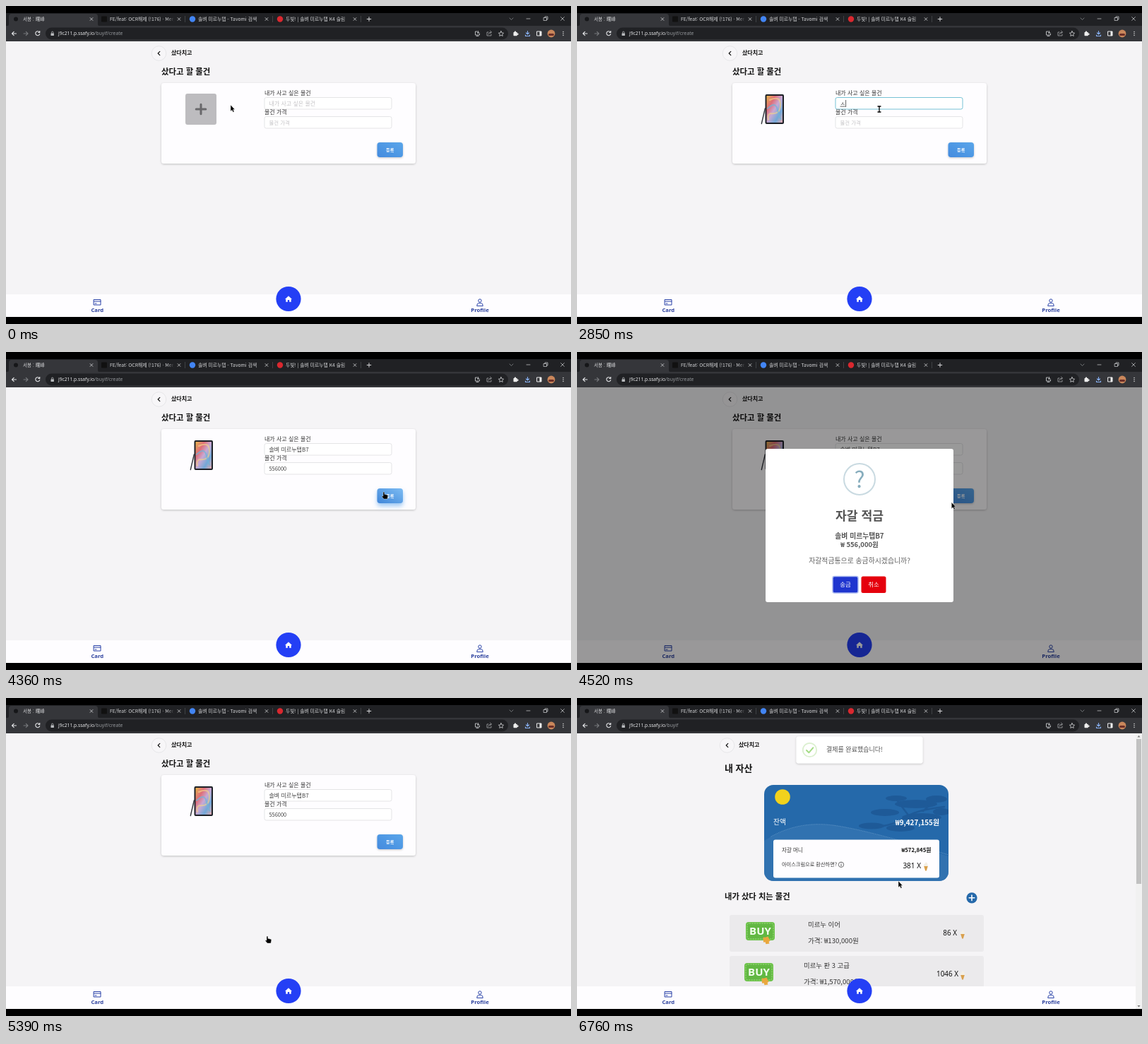
Animation of 800 by 450 pixels, one loop 6790 ms. Source, as an HTML page:

```html
<!DOCTYPE html>
<html lang="ko">
<head>
<meta charset="utf-8">
<title>샀다치고</title>
<style>
html, body { margin: 0; width: 100%; height: 100%; overflow: hidden; background: #000; }
svg { display: block; width: 100vw; height: 100vh; }
text { font-family: "Noto Sans CJK KR", "Noto Sans CJK", "Noto Sans", sans-serif; white-space: pre; }
.latin { font-family: "Noto Sans", sans-serif; }
.digit { font-family: Lato, sans-serif; }
.line { fill: none; stroke-linecap: round; stroke-linejoin: round; }
</style>
</head>
<body>
<svg id="stage" viewBox="0 0 800 450"></svg>
<script>
const LOOP = 6790;
const BLUE = '#2569aa';
const PRODUCT = '솔벼 미르누탭B7';
const PRICE = '556000';

// Drawing helpers; text is placed by its vertical centre.
const text = (x, y, size, str, fill = '#222', weight = 400, anchor = 'start', cls = '') =>
  `<text x="${x}" y="${y + size * .36}" font-size="${size}" fill="${fill}" font-weight="${weight}" text-anchor="${anchor}" class="${cls}">${str}</text>`;
const rect = (x, y, w, h, fill, r = 0, more = '') =>
  `<rect x="${x}" y="${y}" width="${w}" height="${h}" rx="${r}" fill="${fill}" ${more}/>`;
const circle = (x, y, r, fill, more = '') => `<circle cx="${x}" cy="${y}" r="${r}" fill="${fill}" ${more}/>`;
const line = (d, stroke, width = 1, more = '') => `<path class="line" d="${d}" stroke="${stroke}" stroke-width="${width}" ${more}/>`;
const group = (id, body, more = '') => `<g id="${id}" ${more}>${body}</g>`;
const cross = (x, y, r, color, width) => line(`M${x - r} ${y - r}l${2 * r} ${2 * r}m0 ${-2 * r}l${-2 * r} ${2 * r}`, color, width);
const plus = (x, y, r, color, width) => line(`M${x - r} ${y}h${2 * r}M${x} ${y - r}v${2 * r}`, color, width);

const defs = `<defs>
  <linearGradient id="btn" x1="0" y1="1" x2="1" y2="0"><stop stop-color="#438ade"/><stop offset="1" stop-color="#5aa6ea"/></linearGradient>
  <linearGradient id="btnHover" x1="0" y1="1" x2="1" y2="0"><stop stop-color="#3f85d8"/><stop offset="1" stop-color="#7dbcf3"/></linearGradient>
  <linearGradient id="art" x1="0" y1="0" x2="1" y2="1"><stop stop-color="#e7b64c"/><stop offset=".28" stop-color="#df6d78"/><stop offset=".5" stop-color="#c9a9d4"/><stop offset=".75" stop-color="#72a8d8"/><stop offset="1" stop-color="#e5a9b0"/></linearGradient>
  ${[[228, 238], [477, 487]].map(([a, b], i) => `<linearGradient id="fade${i}" gradientUnits="userSpaceOnUse" x1="${a}" x2="${b}" y1="0" y2="0"><stop stop-color="#d5d6d8"/><stop offset="1" stop-color="#d5d6d8" stop-opacity="0"/></linearGradient>`).join('')}
  <filter id="shadow" x="-20%" y="-20%" width="140%" height="150%"><feDropShadow dx="0" dy="1" stdDeviation="1.5" flood-opacity=".22"/></filter>
  <filter id="glow" x="-40%" y="-40%" width="180%" height="220%"><feDropShadow dx="0" dy="4" stdDeviation="3" flood-color="#4b9be8" flood-opacity=".55"/></filter>
  <clipPath id="cardClip"><rect x="265" y="123" width="261" height="136" rx="13"/></clipPath>
  <clipPath id="pageClip"><rect y="50" width="800" height="390"/></clipPath>
</defs>`;

function browser() {
  const ink = '#d5d6d8';
  const tabs = [[24, '서봉 : 曙峰', ink, 6.6], [147, 'FE/feat: OCR해제 (!176) · Merge', 'url(#fade0)', 6.8],
    [272, '솔벼 미르누탭 - Tavomi 검색', ink, 6.8], [396, '두빛! | 솔벼 미르누탭 K4 슬림', 'url(#fade1)', 6.8]];
  return rect(0, 10, 800, 19, '#202124', 0, 'id="strip"') +
    '<path d="M1 28.5q3 0 3-3V15q0-4 4-4h118q4 0 4 4v10.500q0 3 3 3z" fill="#35363a"/>' +
    rect(0, 28, 800, 22, '#35363a') +
    tabs.map(([x, s, fill, size]) => text(x, 18.5, size, s, fill)).join('') +
    [121, 245, 369, 494].map(x => cross(x, 18.5, 1.9, ink, .8)).join('') +
    circle(14, 18.5, 3, '#161719') + rect(135, 14.5, 8, 8, '#111', 1) + circle(264, 18.5, 4.2, '#4285f4') + circle(388, 18.5, 4.2, '#d9282f') +
    rect(253, 14, .6, 9, '#55575b') + rect(377, 14, .6, 9, '#55575b') + rect(502, 14, .6, 9, '#55575b') +
    plus(514, 18.5, 2.8, ink, 1) +
    line('M713 17l2.500 2.500 2.500-2.500', '#96989b', .7) + line('M737 18h5', ink, .7) +
    line('M761.500 16.500h4v4h-4zM763 16.500v-1.500h4v4h-1.500', ink, .7) + cross(788, 18, 2.4, ink, .7) +
    rect(56, 30.5, 655, 17, '#202124', 8.5) +
    line('M14.500 39h-6m2.700-2.700L8.500 39l2.700 2.700', '#e4e5e7', 1.1) +
    line('M25 39h6m-2.700-2.700L31 39l-2.700 2.700', '#77797c', 1.1) +
    line('M47.300 37a3 3 0 1 0 .4 2.600M47.800 35.500v2h-2', '#e4e5e7', 1.1) +
    rect(63.5, 38.5, 4.4, 3.6, '#b9bbbe', .5) + line('M64.500 38.500v-1.200a1.200 1.200 0 0 1 2.400 0v1.200', '#b9bbbe', .8) +
    `<text x="74" y="41.400" font-size="6.7" class="latin" fill="#e6e7e9">j9c211.p.ssafy.io<tspan id="path" fill="#96999d">/buyif/create</tspan></text>` +
    line('M667 36h-2.500v5h6v-2M668.500 35.500v3m-1.500-1.300l1.500 1.500 1.500-1.500M666 42.500h3', '#c6c8ca', .9) +
    line('M683 37h-2v5h6v-2M683 40q.5-3 4-3m-1.500-1.800l2 1.800-2 1.700', '#a6a8aa', .8) +
    line('M701 35.600l1.100 2.300 2.500.3-1.800 1.800.4 2.500-2.200-1.200-2.200 1.200.4-2.500-1.800-1.800 2.500-.3z', '#d5d6d8', .8) +
    rect(718.5, 37, 5.3, 5.3, '#eee', .7) + circle(721, 36.7, 1.2, '#eee') + circle(724.4, 39.7, 1.2, '#eee') +
    line('M738.500 35.500v4.500m-2-2l2 2 2-2M735.500 41v1.500h6V41', '#8ab4f8', 1.1) +
    line('M752 36h6v6h-6z', '#eee', 1) + rect(755.5, 36, 2.5, 6, '#eee') +
    circle(772, 39, 5.4, '#c9875b') + rect(768, 39, 8, 3, '#6e3029', 1.5) +
    [36.5, 39, 41.5].map(y => circle(789, y, .75, '#e0e1e3')).join('');
}

const backButton = (x, y, border, label, labelX) =>
  circle(x, y, 10.3, '#f7f6f8', `stroke="${border}" stroke-width=".8"`) +
  line(`M${x + 1.3} ${y - 2.6}l-2.600 2.600 2.600 2.600`, '#111', 1.2) + text(labelX, y - .8, 8, label, '#111', 700);

const nav = () => rect(0, 408, 800, 32, '#fefdff') +
  line('M124.500 415.500h9.500v7.500h-9.500zM124.500 418h9.500M126 421h2', '#2a43a8', 1) +
  text(129.3, 430, 7.7, 'Card', '#2a3f9d', 600, 'middle', 'latin') +
  circle(671, 417, 2.2, 'none', 'stroke="#2a43a8"') + line('M666.700 424q0-3.600 3-3.600h2.600q3 0 3 3.600z', '#2a43a8', 1) +
  text(671, 430.5, 7.8, 'Profile', '#2a3f9d', 600, 'middle', 'latin') +
  circle(400, 414.5, 17.6, '#243ff5') +
  '<path d="M395 415l5-4.700 5 4.700h-1.300v3.800h-2.500v-2.800h-2.400v2.800h-2.500V415z" fill="#fff"/>';

const field = (id, y) => rect(366, y, 180, 16.5, '#fff', 2.5, `id="${id}Box" stroke="#dedde0" stroke-width=".8"`) +
  `<text id="${id}" x="372.500" y="${y + 11.2}" font-size="${id === 'name' ? 8 : 7.4}"></text>` +
  rect(0, y + 3.5, .7, 10, '#222', 0, `id="${id}Caret"`);

const form = () => backButton(216.5, 67, '#e3e2e5', '샀다치고', 234) +
  text(220, 92.5, 11.4, '샀다고 할 물건', '#111', 700) +
  rect(220, 109, 360, 114, '#fefdff', 4, 'filter="url(#shadow)"') +
  group('addBox', rect(254, 124, 44, 44, '#bdbcbf', 3) + plus(276, 146, 6.8, '#69686b', 3)) +
  group('tablet', rect(266.5, 125, 26.5, 42, '#1d2027', 2) + rect(268.5, 127, 22.5, 38, 'url(#art)', .5) +
    line('M273 133q15-7 15 7t-14 12q-5 2-3 9', '#f1d48a', 2, 'opacity=".65"') +
    line('M270 145q11-11 14 2t5 13', '#6fb5d8', 2, 'opacity=".7"') +
    line('M266.300 145l-5 21.500', '#33363d', 1.4)) +
  text(366, 123, 8, '내가 사고 싶은 물건', '#333') + field('name', 129.5) +
  text(366, 150.5, 8, '물건 가격', '#333') + field('price', 156.5) +
  rect(525.5, 193, 36.5, 21, 'url(#btn)', 4, 'id="submit"') + text(543.7, 203.3, 6.2, '등록', '#fff', 700, 'middle');

const modal = () => rect(267, 137, 266, 217, '#fff', 3) +
  circle(400, 180, 22, 'none', 'stroke="#c9dae1" stroke-width="2"') +
  text(400, 180, 32, '?', '#87adbd', 400, 'middle') +
  text(400, 232, 17.2, '자갈 적금', '#545454', 700, 'middle') +
  text(400, 260, 9.8, PRODUCT, '#545454', 700, 'middle') +
  text(400, 272.5, 9.5, '₩ 556,000원', '#545454', 700, 'middle') +
  text(400, 295.5, 9.9, '자갈적금통으로 송금하시겠습니까?', '#626262', 400, 'middle') +
  rect(362, 317.5, 36, 23.5, '#1f35cf', 2.5, 'stroke="#a9b8ef" stroke-width="1.500"') + text(380, 329, 8.5, '송금', '#fff', 400, 'middle') +
  rect(402.5, 317.5, 35, 23.5, '#e5000d', 2.5) + text(420, 329, 8.5, '취소', '#fff', 400, 'middle');

const KEYS = Array.from({ length: 12 }, (_, i) => [331 + 69 * (i % 3), 182 + 58.4 * Math.floor(i / 3)]);

function keypad() {
  const dots = Array.from({ length: 6 }, (_, i) => {
    const x = 343 + 22.9 * i;
    return circle(x, 135.5, 4.8, 'none', `stroke="${BLUE}" stroke-width="1.200"`) + circle(x, 135.5, 3, BLUE, `id="dot${i}"`);
  });
  const keys = KEYS.map(([x, y], i) => {
    if (i === 9) return line('M345 363a15.800 15.800 0 1 1-2.500-16.500', BLUE, 2.8) + '<path d="M348.500 342v12h-11.500z" fill="' + BLUE + '"/>';
    if (i === 11) return line('M459 343.800h27q3 0 3 3v20.400q0 3-3 3h-27l-9.500-13.200z', BLUE, 2.7) + cross(472, 357, 3.5, BLUE, 2.4);
    return circle(x, y, 16.3, 'none', `stroke="${BLUE}" stroke-width="2.600"`) + text(x, y, 20, i === 10 ? 0 : i + 1, BLUE, 900, 'middle', 'digit');
  });
  return backButton(210.5, 81.5, '#666', '뒤로가기', 229) + text(400, 97, 20, '암호 입력', BLUE, 700, 'middle') +
    dots.join('') + rect(0, 0, 67, 55, '#c9c8ca', 27.5, 'id="hover"') + keys.join('');
}

const cone = (x, y) => `<path d="M${x - 2.8} ${y}h5.600l-2 6.500h-1.600z" fill="#d9a04d"/>` +
  `<path d="M${x - 3} ${y}q-.5-3 2-4l1-2q3 2 2.500 4 1 1 .5 2z" fill="#f3efe6"/>`;
const buyBadge = (x, y) => rect(x - 20.5, y - 12.5, 41, 26, '#6cc24a', 4) +
  rect(x - 18.5, y - 10.5, 37, 22, '#62b843', 3, 'stroke="#a9e08c" stroke-width=".8" stroke-dasharray="2 1.500"') +
  text(x, y + .3, 15, 'BUY', '#f4fff0', 900, 'middle', 'latin') +
  `<path d="M${x + 4} ${y + 9}l3 .2 4-1.200 3 6-2 1.500 1 2.500-5 .8-1-3-2.500.5z" fill="#e9a83e"/>`;
const item = (y, badgeX, x, name, price, countX, count) => rect(216, y, 360, 52, '#ebeaec', 3) + buyBadge(badgeX, y + 22.5) +
  text(x, y + 14, 9.4, name, '#333') + text(x, y + 37, 9.6, `가격: ₩${price}원`, '#333') +
  text(countX, y + 25, 9.9, `${count} X`, '#111', 500, 'end', 'latin') + cone(546, y + 27);

const pine = () => [[452, 142, 15, 4], [480, 150, 30, 6], [509, 143, 15, 5], [436, 162, 20, 5], [488, 169, 28, 6], [417, 181, 18, 4.5], [458, 184, 20, 5], [516, 161, 12, 5]]
  .map(([x, y, rx, ry]) => `<ellipse cx="${x}" cy="${y}" rx="${rx}" ry="${ry}" fill="#1e5a98"/>`).join('') +
  line('M420 183q30-3 45-14t55-15M470 167l-18-24M490 160l18-16', '#1e5a98', 2.5);

const assets = () => backButton(212.5, 67, '#e3e2e5', '샀다치고', 229) + text(209, 99.5, 13, '내 자산', '#111', 700) +
  `<g clip-path="url(#cardClip)">${rect(265, 123, 261, 136, BLUE)}${pine()}` +
  '<path d="M265 202Q310 174 360 180T526 224V259H265z" fill="#3b7ab6" opacity=".55"/>' +
  line('M275 196Q315 174 362 180T526 222', '#8bb4d6', .7, 'stroke-dasharray=".3 2"') + '</g>' +
  circle(291, 140, 10.8, '#f2d21c') + text(278, 176, 9.7, '잔액', '#fff') + text(513, 176, 9.9, '₩9,427,155원', '#fff', 700, 'end') +
  rect(278, 200.5, 235, 54, '#fefdff', 3) + text(290, 215, 7.5, '자갈 머니', '#333') +
  text(290, 235.5, 7.2, '아이스크림으로 환산하면?', '#333') +
  circle(374, 235.8, 3.7, 'none', 'stroke="#333" stroke-width=".7"') + line('M374 235.500v2.300M374 233.800v.1', '#333', .8) +
  text(501.5, 215, 7.8, '₩572,845원', '#111', 700, 'end') + text(487, 237, 10, '381 X', '#111', 500, 'end', 'latin') + cone(494, 238) +
  text(209, 281, 11.3, '내가 샀다 치는 물건', '#111', 700) + circle(559, 282.8, 7.6, BLUE) + plus(559, 282.8, 3.8, '#fff', 1.6) +
  item(307, 259.5, 327, '미르누 이어', '130,000', 538, 86) + item(365, 257.5, 321, '미르누 판 3 고급', '1,570,000', 540, 1046);

const scrollbar = () => rect(791, 50, 9, 390, '#f1f1f1') + rect(792, 58, 7, 205, '#c1c1c1') +
  '<path d="M793.500 55.500l2-2.500 2 2.500zM793.500 435l2 2.500 2-2.500z" fill="#777"/>';

const toast = () => rect(310.5, 54.5, 179, 38, '#fff', 3, 'filter="url(#shadow)"') +
  circle(329.5, 73.5, 9.7, 'none', 'stroke="#dcf0d0" stroke-width="1.800"') + line('M325 74l3.300 3.300 6-7', '#a5dc86', 2) +
  text(353, 73, 9, '결제를 완료했습니다!', '#545454', 500);

const cursors = () =>
  group('arrow', '<path d="M0 0v9l2-1.800 1.500 3 1.600-.8-1.500-2.900H6z" fill="#000" stroke="#fff" stroke-width=".4"/>') +
  group('hand', '<path d="M-2-4.500q1-1.200 1.900 0v2.800l4 1q1 .3.900 1.500L4 5H-1L-3.800 1.500q-.4-1.300 1.800-.4z" fill="#000" stroke="#fff" stroke-width=".4"/>') +
  group('ibeam', line('M-2-4h4M0-4v8M-2 4h4', '#000', 1.3));

document.getElementById('stage').innerHTML = defs + rect(0, 0, 800, 450, '#000') + browser() +
  `<g clip-path="url(#pageClip)">${rect(0, 50, 800, 390, '#f5f4f6')}` +
  group('form', form()) + group('keypad', keypad()) + group('assets', assets()) + group('nav', nav()) + group('scroll', scrollbar()) +
  rect(0, 50, 800, 390, '#000', 0, 'id="overlay"') + group('modal', modal()) + group('toast', toast()) + '</g>' + cursors();

const el = Object.fromEntries([...document.querySelectorAll('#stage [id]')].map(n => [n.id, n]));
const show = (id, on) => { el[id].style.display = on ? '' : 'none'; };
const attr = (id, key, value) => el[id].setAttribute(key, value);
const clamp = v => Math.max(0, Math.min(1, v));
const ramp = (t, from, to) => clamp((t - from) / (to - from));
const between = (t, from, to) => t >= from && t < to;

// Text states of a Hangul input method: initial, vowel, final.
function keystrokes(str) {
  const initials = 'ㄱㄲㄴㄷㄸㄹㅁㅂㅃㅅㅆㅇㅈㅉㅊㅋㅌㅍㅎ';
  const states = [];
  [...str].forEach((ch, i) => {
    const head = str.slice(0, i), code = ch.charCodeAt(0) - 0xAC00;
    if (code >= 0 && code < 11172) {
      states.push([head, initials[Math.floor(code / 588)]]);
      if (code % 28) states.push([head, String.fromCharCode(0xAC00 + code - code % 28)]);
      states.push([head, ch]);
    } else states.push([head + ch, '']);
  });
  return states;
}

const fields = [
  { id: 'name', hint: '내가 사고 싶은 물건', states: keystrokes(PRODUCT), start: 2835, step: 40, focus: 2600, blur: 3660 },
  { id: 'price', hint: '물건 가격', states: keystrokes(PRICE), start: 3740, step: 40, focus: 3660, blur: 4330 }
];

function drawField({ id, hint, states, start, step, focus, blur }, t) {
  const focused = between(t, focus, blur);
  const count = Math.floor((t - start) / step);
  const [done, composing] = count < 0 ? [hint, ''] : states[Math.min(count, states.length - 1)];
  el[id].innerHTML = done + (focused ? `<tspan text-decoration="underline">${composing}</tspan>` : composing);
  attr(id, 'fill', count < 0 ? '#c4c3c6' : '#444');
  attr(id + 'Box', 'stroke', focused ? '#55b3cb' : '#dedde0');
  show(id + 'Caret', focused);
  if (focused) attr(id + 'Caret', 'x', 373 + (count < 0 ? 0 : el[id].getComputedTextLength()));
}

// Time, x, y and pointer kind from that time on.
const pointer = [
  [0, 318, 140, 'arrow'], [90, 312, 142, 'arrow'], [220, 278, 149, 'hand'], [480, 276, 149, 'hand'],
  [850, 90, 165, 'hand'], [1080, 28, 172, 'hand'], [1800, 28, 172, 'hand'], [1950, 90, 165, 'arrow'],
  [2350, 380, 142, 'ibeam'], [2550, 428, 146, 'ibeam'], [3520, 428, 146, 'ibeam'], [3640, 430, 165, 'ibeam'],
  [3980, 430, 165, 'ibeam'], [4120, 500, 190, 'arrow'], [4230, 536, 203, 'hand'], [4400, 536, 203, 'arrow'],
  [4700, 520, 230, 'arrow'], [5040, 390, 333, 'hand'], [5150, 371, 342, 'hand'], [5400, 371, 342, 'arrow'],
  [5480, 332, 205, 'hand'], [5530, 325, 190, 'hand'], [5570, 335, 190, 'hand'], [5630, 395, 192, 'hand'],
  [5670, 400, 193, 'hand'], [5730, 462, 195, 'hand'], [5770, 458, 198, 'hand'], [5850, 328, 250, 'hand'],
  [5880, 335, 251, 'hand'], [5950, 395, 256, 'hand'], [5980, 402, 257, 'hand'], [6060, 459, 264, 'hand'],
  [6400, 458, 264, 'arrow'], [6480, 455, 259, 'arrow'], [LOOP, 455, 259, 'arrow']
];

function pointerAt(t) {
  const i = pointer.findIndex(p => p[0] > t) - 1;
  const [t0, x0, y0, kind] = pointer[i], [t1, x1, y1] = pointer[i + 1];
  const k = ramp(t, t0, t1), e = k * k * (3 - 2 * k);
  return { x: x0 + (x1 - x0) * e, y: y0 + (y1 - y0) * e, kind };
}

const KEYED = [5540, 5640, 5740, 5850, 5955, 6070];

function popScale(k) {
  if (k < .45) return .7 + .35 * k / .45;
  if (k < .8) return 1.05 - .1 * (k - .45) / .35;
  return .95 + .05 * (k - .8) / .2;
}
function pop(id, x, y, k, out = 0) {
  const s = popScale(k) * (1 - out / 2);
  attr(id, 'transform', `translate(${x} ${y}) scale(${s}) translate(${-x} ${-y})`);
  attr(id, 'opacity', clamp(k * 3) * (1 - out));
}

function draw(t) {
  const onKeypad = between(t, 5400, 6400), onAssets = t >= 6400;
  const { x, y, kind } = pointerAt(t);

  attr('strip', 'fill', between(t, 480, 1900) ? '#3a3c3f' : '#202124');
  el.path.textContent = onAssets ? '/buyif' : '/buyif/create';
  show('form', t < 5400);
  show('keypad', onKeypad);
  show('assets', onAssets);
  show('scroll', onAssets);
  show('nav', !onKeypad);

  show('addBox', t < 1950);
  show('tablet', t >= 1950);
  fields.forEach(f => drawField(f, t));
  const hovering = between(t, 4220, 4400);
  attr('submit', 'fill', hovering ? 'url(#btnHover)' : 'url(#btn)');
  attr('submit', 'filter', hovering ? 'url(#glow)' : 'url(#shadow)');

  const closing = ramp(t, 5320, 5390);
  attr('overlay', 'opacity', .4 * ramp(t, 4395, 4470) * (1 - closing));
  show('modal', between(t, 4395, 5390));
  pop('modal', 400, 245.5, ramp(t, 4395, 4520), closing);

  KEYED.forEach((at, i) => show('dot' + i, t >= at));
  const key = KEYS.find(([kx, ky]) => Math.abs(x - kx) < 33 && Math.abs(y - ky) < 27);
  show('hover', key);
  if (key) { attr('hover', 'x', key[0] - 33.5); attr('hover', 'y', key[1] - 27.5); }

  show('toast', t >= 6460);
  pop('toast', 400, 73.5, ramp(t, 6460, 6580));

  for (const id of ['arrow', 'hand', 'ibeam']) show(id, id === kind);
  attr(kind, 'transform', `translate(${x} ${y})`);
}

const begin = performance.now();
function tick() {
  draw((performance.now() - begin) % LOOP);
  requestAnimationFrame(tick);
}
tick();
</script>
</body>
</html>
```
